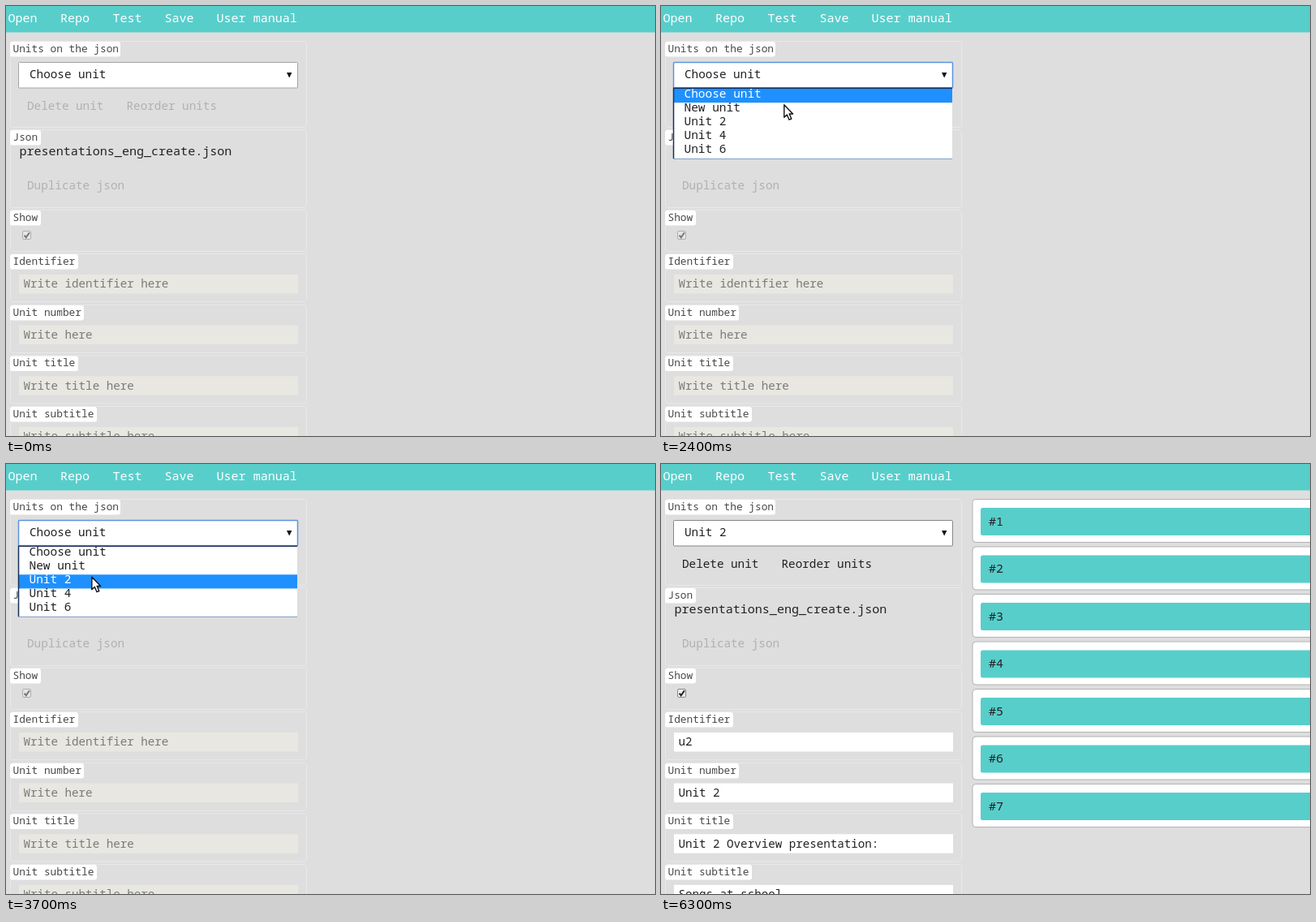
Recreate the animation shown at these times as an HTML page. Size 800 by 530 pixels, loop 6500 ms.

```html
<!DOCTYPE html>
<html>
<head>
<meta charset="utf-8">
<style>
  html, body { margin: 0; width: 100%; height: 100%; overflow: hidden; background: #dedede; }
  svg { display: block; }
  text { font-family: "Noto Sans Mono", "DejaVu Sans Mono", monospace; white-space: pre; }
</style>
</head>
<body>
<svg id="stage" width="800" height="530" viewBox="0 0 800 530"></svg>
<script>
const stage = document.getElementById('stage');
const TEAL = '#58cecb', INK = '#222', FADED = '#b1b1b1';
const ROW_TOP = 102, ROW_H = 17.15;

function add(parent, tag, attrs, content) {
  const el = document.createElementNS('http://www.w3.org/2000/svg', tag);
  for (const key in attrs) el.setAttribute(key, attrs[key]);
  if (content) el.textContent = content;
  parent.appendChild(el);
  return el;
}
const group = () => add(stage, 'g', {});
const box = (parent, x, y, width, height, fill, more) =>
  add(parent, 'rect', { x, y, width, height, fill, ...more });
const label = (parent, x, y, str, size, fill) =>
  add(parent, 'text', { x, y, 'font-size': size, fill }, str);
const show = (el, on) => el.setAttribute('visibility', on ? 'visible' : 'hidden');

// Page frame
box(stage, 0, 0, 800, 32.5, TEAL);
[['Open', 2.5], ['Repo', 67], ['Test', 131.5], ['Save', 195.5], ['User manual', 259.5]]
  .forEach(([name, x]) => label(stage, x, 20, name, 15.05, '#fff'));

[['Units on the json', 43.5, 106, 136], ['Json', 152.5, 96, 38], ['Show', 251.5, 51, 38],
 ['Identifier', 305.5, 59, 84], ['Unit number', 368.5, 59, 91], ['Unit title', 431, 59, 84],
 ['Unit subtitle', 493.5, 59, 107]].forEach(([name, y, h, w]) => {
  box(stage, 5.5, y, 365, h, 'none', { stroke: '#e8e8e8', rx: 3 });
  box(stage, 5, y + 0.5, w, 18.5, '#fff', { rx: 3 });
  label(stage, 8.5, y + 13.2, name, 12.8, '#484848');
});

label(stage, 16.5, 183.5, 'presentations_eng_create.json', 15.05, INK);
label(stage, 26, 225.5, 'Duplicate json', 14.3, FADED);

// Unit picker and its buttons
const picker = box(stage, 15.5, 69.5, 344, 31.5, '#fff', { rx: 1 });
const pickerText = label(stage, 29, 89, '', 14.3, INK);
add(stage, 'path', { d: 'M346 82h6.4l-3.2 6.6z', fill: '#111' });
const hover = box(stage, 16, 107, 114, 32.5, '#f3f3f3');
const buttons = [['Delete unit', 26], ['Reorder units', 148.5]]
  .map(([name, x]) => label(stage, x, 127.5, name, 14.3, FADED));

// Check box
const check = group();
box(check, 20.5, 277.5, 10, 10, '#eee', { stroke: '#888', rx: 1.5 });
add(check, 'path', { d: 'M22.6 282.7l2.1 2.6 4.2-6', fill: 'none', stroke: '#222', 'stroke-width': 2 });

// Text inputs
const fields = [['Write identifier here', 'u2'], ['Write here', 'Unit 2'],
  ['Write title here', 'Unit 2 Overview presentation:'], ['Write subtitle here', 'Songs at school']]
  .map(([hint, value], i) => {
    const y = 331 + i * 62.6;
    return { hint, value, back: box(stage, 16, y, 344, 23.5), text: label(stage, 21.5, y + 16.3, '', 14.2) };
  });

// Cards on the right
const cards = group();
for (let i = 0; i < 7; i++) {
  const y = 43.5 + i * 58.5;
  box(cards, 384, y, 430, 53, '#fff', { stroke: '#b2b2b2', rx: 4 });
  box(cards, 394, y + 10.5, 420, 34, TEAL, { rx: 2.5 });
  label(cards, 404, y + 32, '#' + (i + 1), 15.05, INK);
}

// Open list
const list = group();
box(list, 15, 101, 344, 87.5, '#fff');
const mark = box(list, 16, ROW_TOP, 343, ROW_H, '#1e90ff');
add(list, 'path', { d: 'M15.5 188V101.2H359', fill: 'none', stroke: '#16305c', 'stroke-width': 1.5 });
add(list, 'path', { d: 'M15 188.4H359', stroke: '#7f9cc8' });
const options = ['Choose unit', 'New unit', 'Unit 2', 'Unit 4', 'Unit 6']
  .map((name, i) => label(list, 28.5, 113 + i * 17.05, name, 14.45, INK));

// Pointer shapes
const pointer = group();
const ink = { fill: '#fff', stroke: '#111', 'stroke-width': 1.4, 'stroke-linejoin': 'round' };
const arrow = add(pointer, 'path', { ...ink, d: 'M.8 .8V16.2L4.3 13L7 19.2L9.8 18L7.2 12H11.6Z' });
const hand = add(pointer, 'path', { ...ink,
  d: 'M5.5 12V2.8Q5.5 1 7 1T8.6 2.8V8.5Q10.2 7.2 11.4 9Q13 8 14 9.7Q16.6 9 16.6 12V16.5L14.8 20V23H6.8V20.5L1.5 14.2Q.8 11.6 3 12L5.5 14.2ZM8.6 8.5V12M11.4 9V12.4M14 9.7V12.8' });

const PATH = [[100, 776, 532], [700, 354, 83], [1800, 354, 82], [2400, 151, 121], [3000, 114, 172],
  [3100, 112, 178], [3200, 106, 138], [4200, 104, 139], [5600, 104, 139], [6200, 802, -12]];

function position(t) {
  const next = PATH.findIndex(p => p[0] > t);
  if (next <= 0) return PATH[next ? PATH.length - 1 : 0].slice(1);
  const [t0, x0, y0] = PATH[next - 1], [t1, x1, y1] = PATH[next];
  const k = (t - t0) / (t1 - t0);
  return [x0 + (x1 - x0) * k, y0 + (y1 - y0) * k];
}

function draw(t) {
  const open = t >= 1800 && t < 4500, loaded = t >= 4500;
  const overButton = loaded && t < 5700;
  const focused = t >= 1800 && t < 6000;
  const [x, y] = position(t);

  picker.setAttribute('stroke', focused ? '#5b93e0' : t < 700 ? '#a4a4a4' : '#858585');
  picker.setAttribute('stroke-width', focused ? 1.5 : 1);
  pickerText.textContent = loaded ? 'Unit 2' : 'Choose unit';
  buttons.forEach(b => b.setAttribute('fill', loaded ? INK : FADED));
  show(hover, overButton);
  check.setAttribute('opacity', loaded ? 1 : 0.55);
  fields.forEach(f => {
    f.text.textContent = loaded ? f.value : f.hint;
    f.text.setAttribute('fill', loaded ? INK : '#7b7b79');
    f.back.setAttribute('fill', loaded ? '#fff' : '#e8e7e1');
  });
  show(cards, loaded);

  show(list, open);
  const row = t < 2500 ? 0 : Math.max(0, Math.min(4, Math.floor((y - ROW_TOP) / ROW_H)));
  mark.setAttribute('y', ROW_TOP + row * ROW_H);
  options.forEach((o, i) => o.setAttribute('fill', i === row ? '#fff' : INK));

  pointer.setAttribute('transform', `translate(${x} ${y})`);
  show(arrow, t >= 100 && t < 6300 && !overButton);
  show(hand, overButton);
}

const start = performance.now();
function tick() {
  const t = (performance.now() - start) % 6500;
  draw(Math.floor(t / 100) * 100);
  requestAnimationFrame(tick);
}
tick();
</script>
</body>
</html>
```
